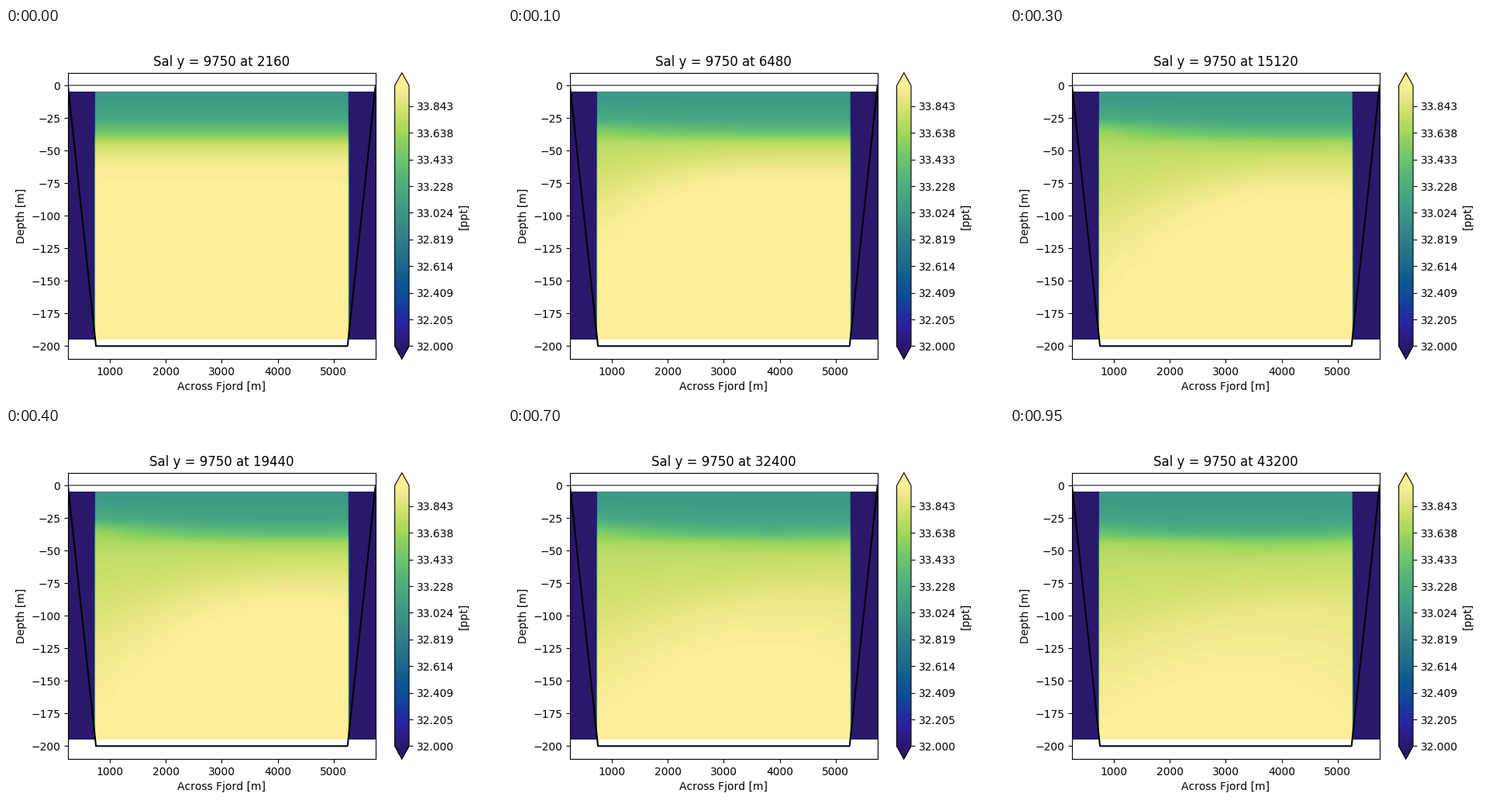
These frames come from a looping animation (640 by 480 pixels, 1 s). A matplotlib script:

```python
import numpy as np
import matplotlib.pyplot as plt
from matplotlib.animation import FuncAnimation
from matplotlib.colors import LinearSegmentedColormap

FRAMES, INTERVAL, STEP = 20, 50, 2160

STOPS = ["#29186b", "#2a23a0", "#0f4799", "#125f8e", "#267489", "#358888",
         "#419d85", "#51b27c", "#6fc66b", "#a0d65b", "#d4e170", "#fdee99"]
haline = LinearSegmentedColormap.from_list("haline", STOPS, N=256)
levels = np.linspace(32, 34, 128)

x = np.arange(250, 5751, 500)
z = np.arange(-5, -196, -10)
across = (x[1:-1] - 750) / 4500


def isohaline(frame, rest, left, sink, right, power=0.8):
    """Depth across the fjord: the middle sinks while both walls pull away."""
    s = frame / (FRAMES - 1)
    spread = 1.8 + 2.6 * np.exp(-frame / 5)
    middle = rest + sink * s**power
    wall = rest + (left - rest) * (1 - np.exp(-frame / 2.5)) + 6 * s**2
    return (middle + (wall - middle) * (1 - across)**spread
            + right * s**1.5 * across**3)


def salinity(frame):
    green = isohaline(frame, rest=31, left=27, sink=7, right=-4)
    lime = isohaline(frame, rest=41, left=34.5, sink=8, right=-4)
    olive = isohaline(frame, rest=47, left=88, sink=26, right=0)
    straw = isohaline(frame, rest=55, left=126, sink=31, right=14)
    pale = isohaline(frame, rest=67, left=172, sink=50, right=60, power=1.5)

    values = [33.02, 33.13, 33.27, 33.64, 33.75, 33.82, 33.92, 34.0]
    field = np.zeros((len(z), len(x)))
    for i, (g, l, o, s, p) in enumerate(zip(green, lime, olive, straw, pale), 1):
        depths = [5, g - 8, g, l, l + 0.35 * (o - l), o, s, p]
        field[:, i] = np.interp(-z, depths, values)
    return field + 0.005 * (field >= 34)


def draw_field(frame):
    return ax.contourf(x, z, salinity(frame), levels=levels, cmap=haline, extend="both")


plt.rcParams["text.kerning_factor"] = 6
fig, ax = plt.subplots(figsize=(6.4, 4.8), dpi=100)
contours = draw_field(0)
fig.colorbar(contours, ax=ax, label="[ppt]", ticks=levels[::13], format="%.3f")
ax.plot([250, 5750], [0, 0], color="#62685a", lw=1.2)
ax.plot([250, 750, 5250, 5750], [0, -200, -200, 0], color="black")
ax.set(xlim=(250, 5750), ylim=(-210, 10),
       xlabel="Across Fjord [m]", ylabel="Depth [m]")
title = ax.set_title("")


def update(frame):
    global contours
    contours.remove()
    contours = draw_field(frame)
    title.set_text(f"Sal y = 9750 at {STEP * (frame + 1)}")
    return contours, title


anim = FuncAnimation(fig, update, frames=FRAMES, interval=INTERVAL,
                     init_func=lambda: (), repeat=True, repeat_delay=0)
plt.show()
```
